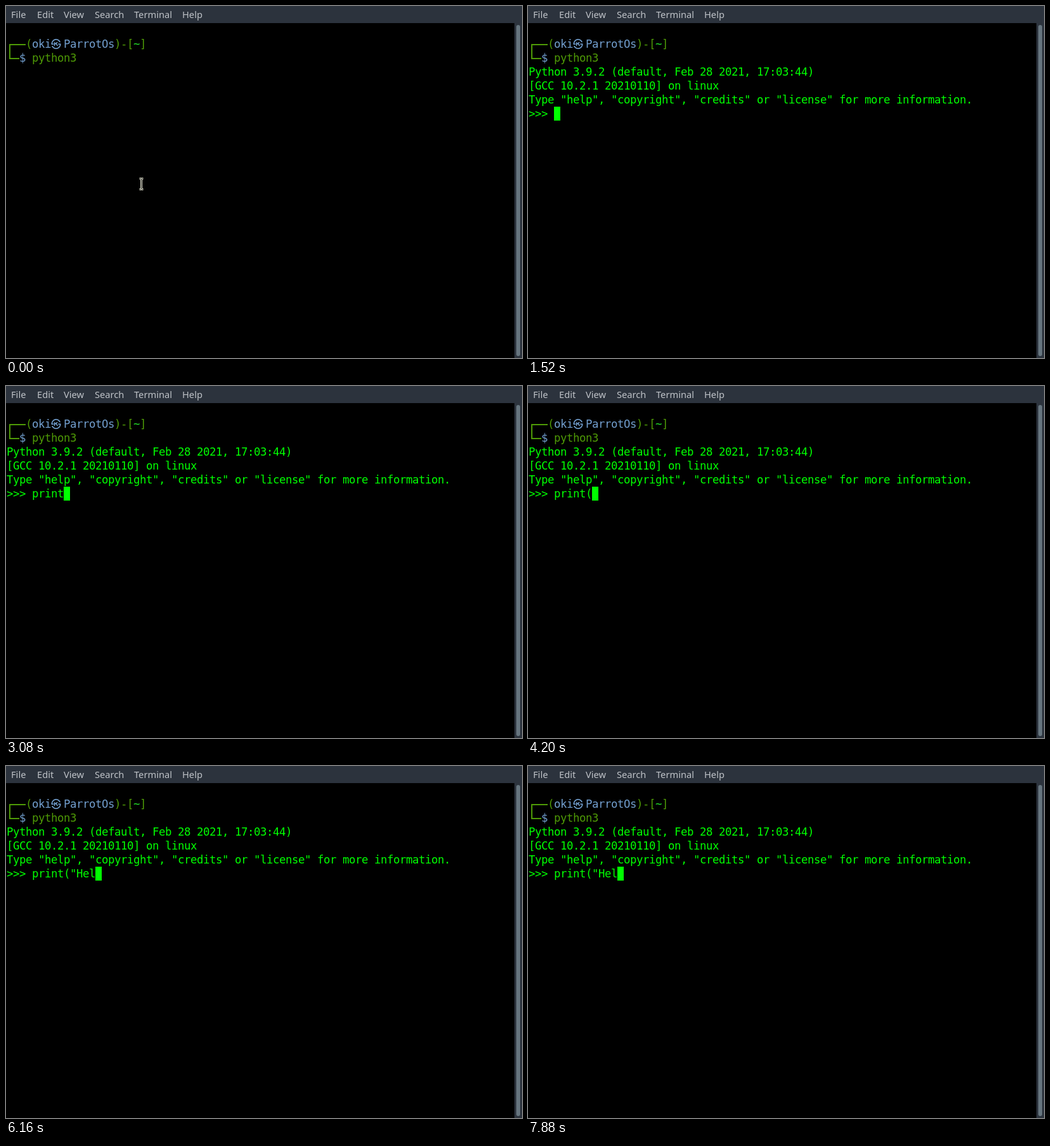
Write an HTML page that moves like this. It is 814 px wide and 556 px high and loops after 8 s.

```html
<!DOCTYPE html>
<html lang="en">
<head>
<meta charset="utf-8">
<title>Terminal</title>
<style>
  html, body { margin: 0; width: 100%; height: 100%; overflow: hidden; background: #000; }
  svg { display: block; width: 814px; height: 556px; }
  text { white-space: pre; }
  /* 13pt glyphs snapped to a 10px cell */
  .mono { font: 17.33px "DejaVu Sans Mono", monospace; letter-spacing: -0.434px; }
  .sign { font: 16px "Noto Sans CJK KR", "Noto Sans CJK JP", sans-serif; }
  .menu { font: 14.67px "Noto Sans", sans-serif; fill: #bfc3c8; }
</style>
</head>
<body>
<svg id="stage" viewBox="0 0 814 556">
  <rect width="814" height="556" fill="#000"/>
  <rect width="814" height="27" fill="#2c333d"/>
  <rect x="802" y="27" width="12" height="529" fill="#2c333d"/>
  <rect x="805" y="30" width="6" height="523" rx="3" fill="#66757f"/>
  <path d="M31 61H6V83H21" fill="none" stroke="#4e9a06" stroke-width="2"/>
</svg>
<script>
const LOOP = 8000, CELL = 10, ROW = 22, LEFT = 1, TOP = 49;
const GREEN = "#4e9a06", BLUE = "#729fcf", LIME = "#00ff00";
const stage = document.getElementById("stage");

function add(tag, attrs, parent = stage) {
  const el = document.createElementNS("http://www.w3.org/2000/svg", tag);
  for (const key in attrs) el.setAttribute(key, attrs[key]);
  return parent.appendChild(el);
}

function write(row, col, str, fill, parent = stage) {
  const el = add("text", { class: "mono", x: LEFT + col * CELL, y: TOP + row * ROW + 17, fill }, parent);
  el.textContent = str;
  return el;
}

const menu = [["File", 8], ["Edit", 49], ["View", 91], ["Search", 140], ["Terminal", 202], ["Help", 278]];
for (const [label, x] of menu) add("text", { class: "menu", x, y: 19 }).textContent = label;

// Shell prompt
write(0, 3, "(", GREEN);
write(0, 4, "oki", BLUE);
write(0, 7, "㉿", BLUE).setAttribute("class", "sign");
write(0, 9, "ParrotOs", BLUE);
write(0, 17, ")-[", GREEN);
write(0, 20, "~", "#22e02a").setAttribute("font-weight", "bold");
write(0, 21, "]", GREEN);
write(1, 2, "$", BLUE);
write(1, 4, "python3", GREEN);

// Python session
const session = add("g", {});
[
  "Python 3.9.2 (default, Feb 28 2021, 17:03:44)",
  "[GCC 10.2.1 20210110] on linux",
  'Type "help", "copyright", "credits" or "license" for more information.',
  ">>> "
].forEach((line, i) => write(2 + i, 0, line, LIME, session));
const input = write(5, 4, "", LIME, session);
const cursor = add("rect", { y: TOP + 5 * ROW, width: CELL, height: ROW, fill: LIME }, session);

// Mouse pointer
const pointer = add("g", { fill: "none" });
const beam = "M210.5 272.8H212.5L213.5 273.5L214.5 272.8H216.5M213.5 273.5V288.8M210.5 289.5H212.5L213.5 288.8L214.5 289.5H216.5";
add("path", { d: beam, stroke: "#f4f4e0", "stroke-width": 3 }, pointer);
add("path", { d: beam, stroke: "#000", "stroke-width": 1 }, pointer);

const START = 40;
const typed = 'print("Hel';
const keyTimes = [1680, 2040, 2280, 2440, 2600, 4200, 4320, 5920, 6040, 6130];
const blinkOff = [[880, 1440], [3560, 4200], [4990, 5480], [7080, 7640]];

function render(t) {
  const count = keyTimes.filter(k => k <= t).length;
  const off = blinkOff.some(([from, to]) => t >= from && t < to);
  session.style.display = t < START ? "none" : "";
  pointer.style.display = t < START ? "" : "none";
  input.textContent = typed.slice(0, count);
  cursor.setAttribute("x", LEFT + (4 + count) * CELL);
  cursor.style.display = off ? "none" : "";
}

const begin = performance.now();
function tick() {
  render((performance.now() - begin) % LOOP);
  requestAnimationFrame(tick);
}
render(0);
requestAnimationFrame(tick);
</script>
</body>
</html>
```
